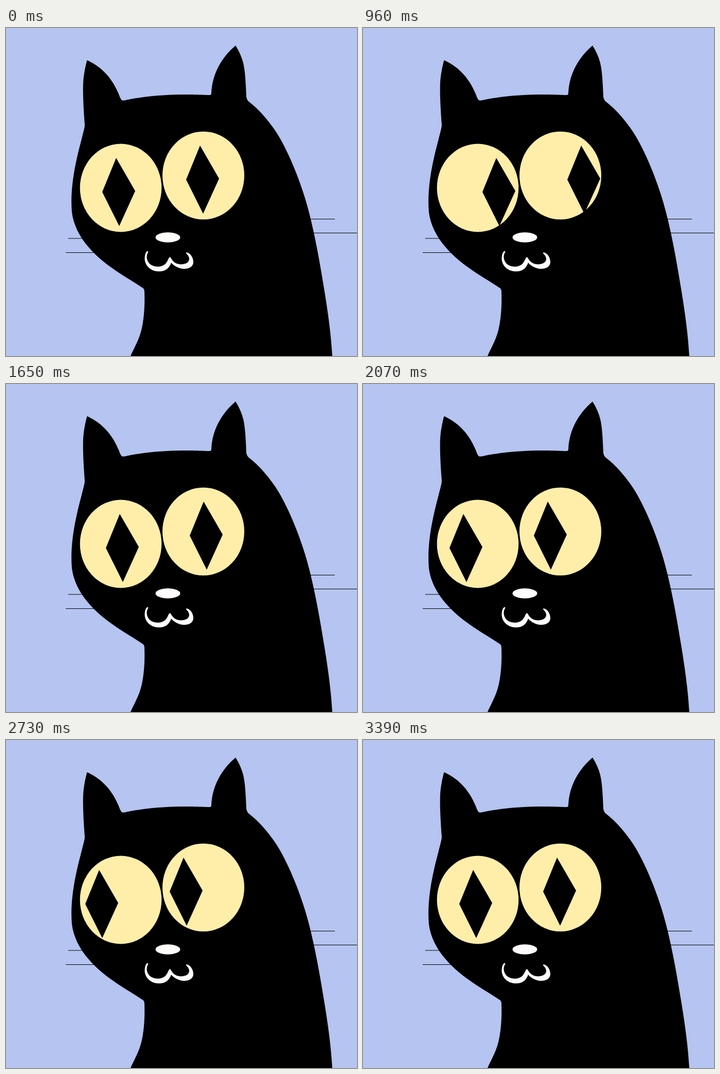
Animation of 682 by 636 pixels, one loop 3.42 s. Source, as an HTML page:

```html
<!DOCTYPE html>
<html lang="en">
<head>
<meta charset="utf-8">
<title>Cat with wandering eyes</title>
<style>
  html, body { margin: 0; width: 100%; height: 100%; overflow: hidden; background: #b5c4f0; }
  svg { display: block; }
</style>
</head>
<body>
<svg width="682" height="636" viewBox="0 0 682 636">
  <path d="M121 408H152M116 435.5H174M586 370.5H639M595 397.5H682" stroke="#000" stroke-width="1.2"/>
  <path d="M242 636C248 622 258 606 263 586C268 566 270 540 269 512Q269 507 267 505
    C250 493 215 474 187 451C160 428 133 397 128 357C124 310 135 260 146 219
    C150 203 153 193 153 188C151 160 149 130 150 106C151 90 154 76 157 64Q157 62 160 63.5
    C188 77 207 99 219 128Q222 137 225 140Q227 141 232 140C275 131 315 129 350 129
    C375 129 385 130 396 130Q399 130 399 126C401 88 419 57 446 34C453 45 458 56 461 68
    C465 85 466 110 467 134Q468 139 471 142C490 157 503 171 521 196
    C543 227 567 284 581 330C598 385 611 460 621 524C629 575 632 605 634 636Z"/>
  <g fill="#ffeeaa">
    <ellipse cx="223" cy="310" rx="79.3" ry="85.5"/>
    <ellipse cx="383.5" cy="286" rx="79.5" ry="85.3"/>
  </g>
  <path id="left" d="M214 252L251 316L220 384L187 318Z"/>
  <path id="right" d="M377 228L414 292L383 360L350 294Z"/>
  <g fill="#fffcfc">
    <ellipse cx="314.5" cy="406" rx="24" ry="9.7"/>
    <path d="M275 432.5Q277 432 276 435C272 441 273 450 278 456C285 464 301 465 309 458
      C314 453 315 448 317 445Q319 443 321 447C326 456 334 459 343 458C353 457 356 452 356 447
      C355 442 353 440 350 437Q349 434 354 436C361 440 364 447 364 455C363 463 356 467 346 467
      C336 467 326 461 321 455C317 466 310 472 297 472C281 472 269 460 269.5 446
      C270 438 272 434 275 432.5Z"/>
  </g>
</svg>
<script>
const LOOP = 3420, STEP = 30;

// Horizontal pupil offsets as [time in ms, px], linear in between.
const tracks = {
  left: [[0, 0], [933, 46.6], [1650, 6.7], [2500, -44.6], [3390, 0]],
  right: [[0, 0], [933, 48.5], [2503, -43], [3390, 0]]
};

function offsetAt(keys, time) {
  const next = keys.findIndex(([t]) => t > time);
  if (next < 0) return keys[keys.length - 1][1];
  const [t0, x0] = keys[next - 1], [t1, x1] = keys[next];
  return x0 + (x1 - x0) * (time - t0) / (t1 - t0);
}

function draw() {
  const time = Math.floor(performance.now() % LOOP / STEP) * STEP;
  for (const [id, keys] of Object.entries(tracks)) {
    const x = Math.round(offsetAt(keys, time));
    document.getElementById(id).setAttribute("transform", `translate(${x})`);
  }
  requestAnimationFrame(draw);
}
draw();
</script>
</body>
</html>
```
